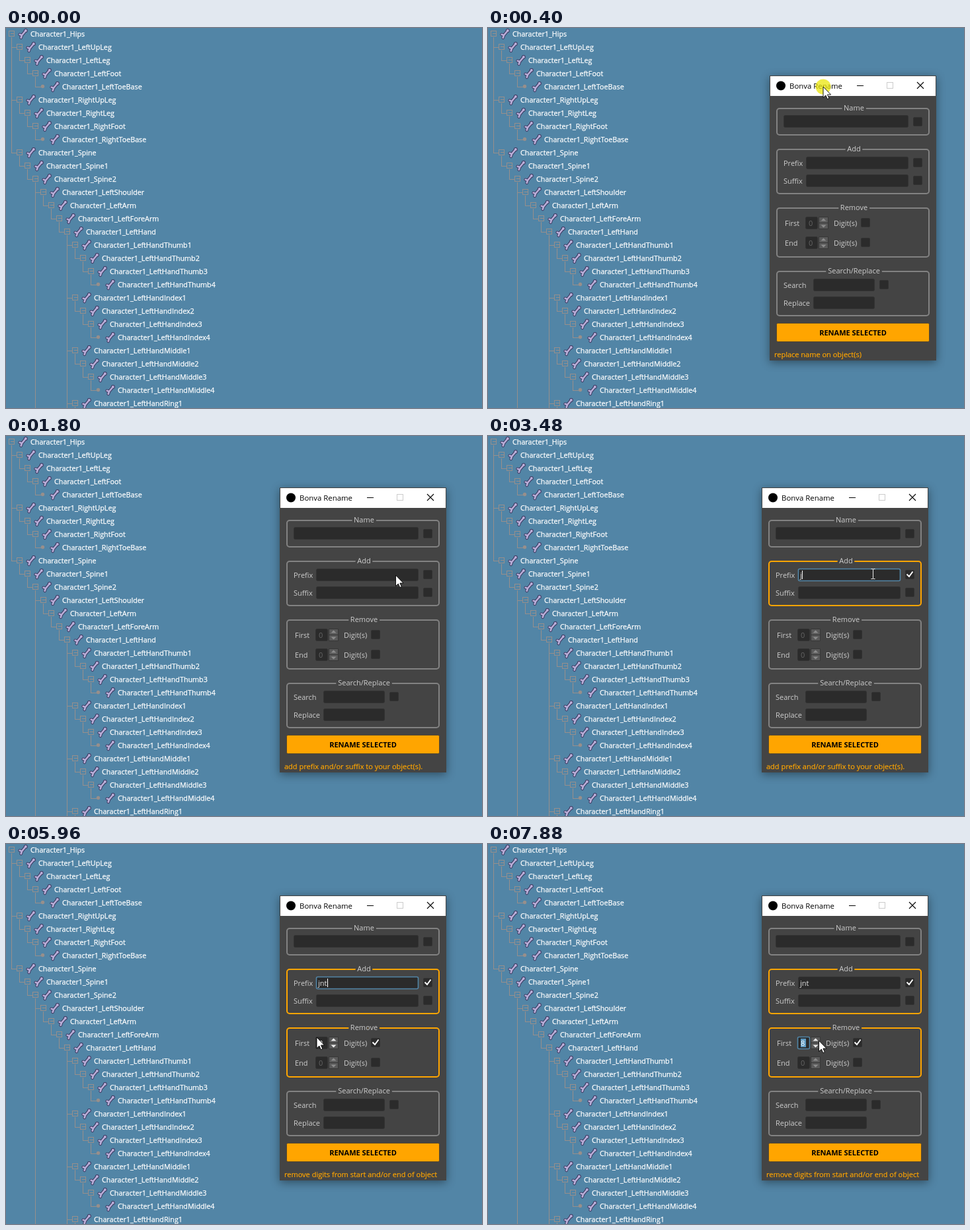
Recreate the animation shown at these times as an HTML page. Size 720 by 576 pixels, loop 8000 ms.

```html
<!DOCTYPE html>
<html lang="en">
<head>
<meta charset="utf-8">
<title>Rename tool</title>
<style>
  html, body { margin: 0; width: 100%; height: 100%; overflow: hidden; background: #5285a6; }
  svg { display: block; font: 11px "Open Sans", "Noto Sans", sans-serif; }
  .tree text { font-size: 10.75px; fill: #fff; stroke: #fff; stroke-width: .25px; }
  .wires { fill: none; stroke: #978f8c; shape-rendering: crispEdges; }
  .shadow { filter: drop-shadow(0 3px 7px rgba(0, 0, 0, .42)); }
  .win text { fill: #cdcdcd; }
  .win .caption { font-size: 11.4px; fill: #000; }
  .win .head { text-anchor: middle; paint-order: stroke; stroke: #444; stroke-width: 7px; }
  .win .go { font-weight: bold; text-anchor: middle; fill: #000; }
  .win .hint { fill: #ffa500; stroke: #ffa500; stroke-width: .2px; }
  .box { fill: none; stroke: #828282; stroke-width: 2; }
  .box.on { stroke: #ffa500; }
  .field, .check { fill: #2b2b2b; stroke: #323232; }
  .field.on { stroke: #5285a6; stroke-width: 1.6; }
  .tick { fill: none; stroke: #fff; stroke-width: 2; }
  .win .typed { fill: #e4e4e4; }
</style>
</head>
<body>
<svg id="stage" width="720" height="576" viewBox="0 0 720 576"></svg>
<script>
const LOOP = 8000, STEP = 40;

// ---- joint tree -------------------------------------------------------
const rows = [];
const chain = (depth, names) =>
  names.split(' ').forEach((name, i) => rows.push({ name, depth: depth + i }));
const finger = name => chain(8, [1, 2, 3, 4].map(n => `LeftHand${name}${n}`).join(' '));

chain(0, 'Hips');
for (const side of ['Left', 'Right'])
  chain(1, ['UpLeg', 'Leg', 'Foot', 'ToeBase'].map(part => side + part).join(' '));
chain(1, 'Spine Spine1 Spine2 LeftShoulder LeftArm LeftForeArm LeftHand');
['Thumb', 'Index', 'Middle', 'Ring', 'Pinky'].forEach(finger);
chain(4, 'RightShoulder');

// a shaft from the upper right that ends in two lobes
const bone = 'M20.7 9.8L24 11L22.7 14.8M24 11L29.8 4';

function treeMarkup() {
  const last = [];
  let wires = '', items = '';
  rows.forEach(({ name, depth }, i) => {
    const y = 9 + 20 * i, shift = 12 * depth, x = 8.5 + shift;
    const leaf = !rows[i + 1] || rows[i + 1].depth <= depth;
    last[depth] = y;
    if (depth) {
      const px = x - 12;
      wires += `M${px} ${last[depth - 1] + 5}V${y + .5}H${leaf ? x - 1 : x - 4}`;
    }
    if (leaf) items += `<circle cx="${x - 1}" cy="${y - .5}" r="2.7" fill="#978f8c"/>`;
    else wires += `M${x - 4} ${y - 4.5}h8v8h-8zM${x - 2} ${y - .5}h5`;
    items += `<g transform="translate(${shift} ${y - 9})" fill="none"
        stroke-linecap="round" stroke-linejoin="round">
      <path d="${bone}" stroke="#3c3860" stroke-width="4.6"/>
      <circle cx="29.8" cy="4" r="3" fill="#3c3860"/>
      <path d="${bone}" stroke="#b9aed8" stroke-width="2.7"/>
      <circle cx="29.8" cy="4" r="2" fill="#b9aed8"/>
      </g><text x="${37 + shift}" y="${y + 4}">Character1_${name}</text>`;
  });
  return `<g class="tree"><path class="wires" d="${wires}"/>${items}</g>`;
}

// ---- dialog -----------------------------------------------------------
const text = (x, y, s, cls = '', id = '') =>
  `<text x="${x}" y="${y}" class="${cls}" id="${id}">${s}</text>`;
const group = (y, h, title, id = '') =>
  `<rect class="box" id="${id}" x="425" y="${y}" width="230" height="${h}" rx="4"/>` +
  text(541.5, y + 3, title, 'head');
const field = (x, y, w, id = '') =>
  `<rect class="field" id="${id}" x="${x + .5}" y="${y + .5}" width="${w - 1}" height="18" rx="2"/>`;
const check = (x, y, id = '') =>
  `<rect class="check" x="${x + .5}" y="${y + .5}" width="13" height="13" rx="1.5"/>` +
  (id && `<path class="tick" id="${id}" d="M${x + 2.5} ${y + 6.5}l3.5 3.5l5.5 -7.5"/>`);
const spin = (y, id) => field(468, y, 19, id + 'Field') +
  `<rect id="${id}Sel" x="473" y="${y + 3}" width="8" height="13" fill="#5f9cc4"/>
   <path d="M488.5 ${y + .5}h14v9h-14zM488.5 ${y + 9.5}h14v9h-14z" fill="#5a5a5a" stroke="#363636"/>
   <path id="${id}Arrows" d="M491.5 ${y + 6.5}h8l-4 -4zM491.5 ${y + 12.5}h8l-4 4z"/>` +
  text(473, y + 14, '0', '', id + 'Num');

const dialog = `<g id="win" class="win">
  <rect class="shadow" x="414" y="78" width="252" height="432" fill="#444"/>
  <rect x="415" y="79" width="250" height="30" fill="#fff"/>
  <circle cx="431" cy="93.5" r="7" fill="#000"/>
  ${text(444, 98, 'Bonva Rename', 'caption')}
  <path d="M546 93.5h10" stroke="#000"/>
  <rect x="591.5" y="88.5" width="9" height="9" fill="none" stroke="#ccc"/>
  <path d="M637 88l10 10m0 -10l-10 10" stroke="#000" stroke-width="1.1"/>
  ${group(128, 40, 'Name')}${field(435, 138, 189)}${check(631, 141)}
  ${group(190, 67, 'Add', 'addBox')}
  ${text(435, 215, 'Prefix')}${field(469, 201, 155, 'prefix')}${check(631, 203, 'addTick')}
  ${text(435, 242, 'Suffix')}${field(469, 228, 155)}${check(631, 230)}
  ${text(472, 215, '', 'typed', 'typed')}
  <rect id="caret" y="204" width="1" height="13" fill="#fff"/>
  ${group(279, 74, 'Remove', 'cutBox')}
  ${text(437, 306, 'First')}${spin(292, 'first')}${text(511, 306, 'Digit(s)')}${check(552, 294, 'cutTick')}
  ${text(437, 336, 'End')}${spin(322, 'end')}${text(511, 336, 'Digit(s)')}${check(552, 324)}
  ${group(375, 67, 'Search/Replace')}
  ${text(435, 400, 'Search')}${field(480, 386, 93)}${check(580, 388)}
  ${text(435, 427, 'Replace')}${field(480, 413, 93)}
  <rect x="424.5" y="453.5" width="231" height="28" rx="2" fill="#ffa500" stroke="#5c4a28"/>
  ${text(540, 472, 'RENAME SELECTED', 'go')}
  ${text(421, 505, '', 'hint', 'hint')}
</g>
<g id="mouse">
  <circle id="halo" r="11.5" fill="#ebe60a" opacity=".74"/>
  <path id="arrow" d="M0 0V16.6L3.8 13L6.3 18.6L8.9 17.5L6.4 12H11.6Z"
    fill="#fff" stroke="#000" stroke-width=".9"/>
  <path id="beam" d="M-3 -7.5h2.5l.5 .5l.5 -.5h2.5M0 -7V7M-3 7.5h2.5l.5 -.5l.5 .5h2.5"
    fill="none" stroke="#e8e8e8"/>
</g>`;

document.getElementById('stage').innerHTML = treeMarkup() + dialog;
const el = {};
document.querySelectorAll('[id]').forEach(n => { if (n.id) el[n.id] = n; });

// ---- timeline ---------------------------------------------------------
const path = [
  [1000, 497, 95], [1800, 589.5, 211], [1840, 589.5, 211], [2280, 638, 210],
  [2400, 638, 210], [2600, 582.5, 209], [4320, 582.5, 209], [5080, 555, 306],
  [5200, 555, 306], [5400, 556, 301], [5600, 556, 301], [5800, 484, 295],
  [5960, 470, 293], [6100, 470, 293], [6600, 500.5, 298]
];
const spins = [[6640, 6720], [6800, 6880], [6920, 7080]];
for (let t = 7160; t < 7880; t += 160) spins.push([t, t + 80]);
const presses = [[80, 1040], [2280, 2440], [2760, 2880], [5400, 5600], ...spins];
const caretOn = [[2600, 3160], [3480, 4360], [4880, 5400], [5960, 6480]];
const typing = [[3480, 'j', 475], [3640, 'jn', 482], [3760, 'jnt', 486]];
const hints = [
  [0, 'replace name on object(s)'],
  [1520, 'add prefix and/or suffix to your object(s).'],
  [4800, 'remove digits from start and/or end of object']
];

const inside = (spans, t) => spans.some(([a, b]) => t >= a && t < b);
const latest = (list, t) => list.filter(e => t >= e[0]).pop();
const show = (node, on) => { node.style.display = on ? '' : 'none'; };
const move = (node, x, y) => node.setAttribute('transform', `translate(${x} ${y})`);
const put = (node, s) => { if (node.textContent !== s) node.textContent = s; };

function winAt(t) {
  if (t >= 800) return [415, 79];
  const left = Math.max(0, (520 - t) / 440);
  return [Math.round(416 + 257 * left ** 2.4), Math.round(79 - 10.8 * left ** .5)];
}

function mouseAt(t) {
  if (t < 1000) return [winAt(t + 12)[0] + 82, winAt(t)[1] + 16];
  const i = path.findIndex(k => k[0] > t);
  if (i < 0) return path[path.length - 1].slice(1);
  const [t0, x0, y0] = path[i - 1], [t1, x1, y1] = path[i];
  const u = (t - t0) / (t1 - t0), e = u * u * (3 - 2 * u);
  return [x0 + (x1 - x0) * e, y0 + (y1 - y0) * e];
}

function draw(time) {
  const t = Math.floor(time / STEP) * STEP;
  const open = t >= 80, adding = t >= 2440, cutting = t >= 5600, spinning = t >= 6640;

  const [wx, wy] = winAt(t);
  show(el.win, open);
  move(el.win, wx - 415, wy - 79);

  const [mx, my] = mouseAt(t);
  const beam = t >= 2520 && mx > 469 && mx < 624 && my > 200 && my < 221;
  show(el.mouse, open);
  move(el.mouse, mx, my);
  show(el.arrow, !beam);
  show(el.beam, beam);
  show(el.halo, inside(presses, t));
  el.halo.setAttribute('cx', beam ? 2.5 : 0);

  el.addBox.classList.toggle('on', adding);
  el.cutBox.classList.toggle('on', cutting);
  el.prefix.classList.toggle('on', adding && !spinning);
  el.firstField.classList.toggle('on', spinning);
  show(el.addTick, adding);
  show(el.cutTick, cutting);

  const [, word, caretX] = latest(typing, t) || [0, '', 472];
  put(el.typed, word);
  el.caret.setAttribute('x', caretX);
  show(el.caret, inside(caretOn, t));

  put(el.firstNum, String(spins.filter(s => t >= s[0]).length));
  el.firstNum.style.fill = cutting ? '#fff' : '#666';
  el.endNum.style.fill = '#666';
  el.firstArrows.setAttribute('fill', cutting ? '#eee' : '#8c8c8c');
  el.endArrows.setAttribute('fill', '#8c8c8c');
  show(el.firstSel, spinning);
  show(el.endSel, false);

  put(el.hint, latest(hints, t)[1]);
}

const start = performance.now();
function tick() {
  draw((performance.now() - start) % LOOP);
  requestAnimationFrame(tick);
}
tick();
</script>
</body>
</html>
```
